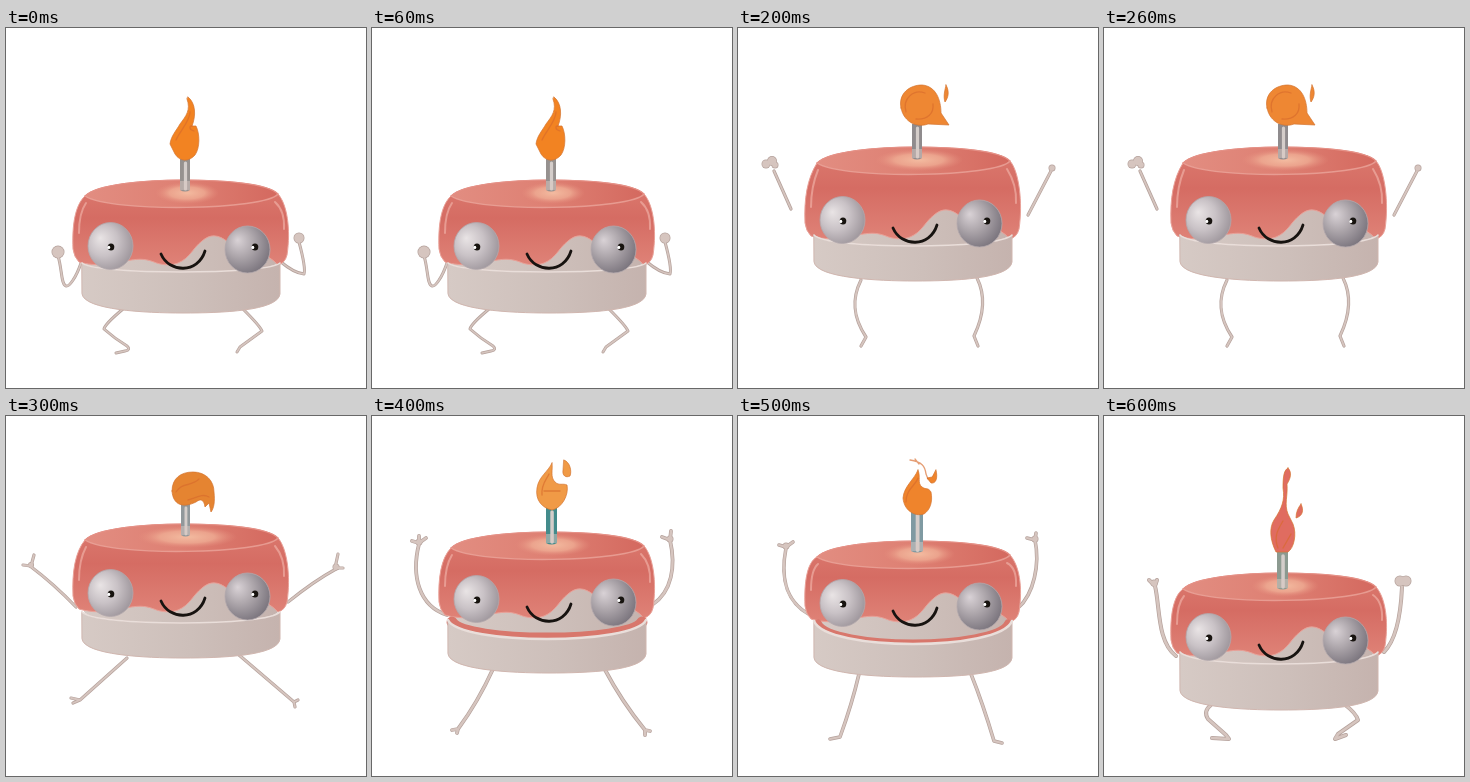
Animation, 360 px wide and 360 px high, one loop 700 ms. Source, as an HTML page:

```html
<!DOCTYPE html>
<html lang="en">
<head>
<meta charset="utf-8">
<title>Dancing cake</title>
<style>
  html, body { margin: 0; width: 100%; height: 100%; overflow: hidden; background: #fff; }
  svg { display: block; width: 100vw; height: 100vh; }
  path { stroke-linecap: round; stroke-linejoin: round; }
</style>
</head>
<body>
<svg viewBox="0 0 360 360">
  <defs>
    <linearGradient id="icing" x2="0" y2="1">
      <stop offset="0" stop-color="#dc7b70"/><stop offset=".45" stop-color="#d56c63"/><stop offset="1" stop-color="#df8277"/>
    </linearGradient>
    <linearGradient id="top">
      <stop offset="0" stop-color="#e28d81"/><stop offset=".5" stop-color="#de8073"/><stop offset="1" stop-color="#d4695f"/>
    </linearGradient>
    <linearGradient id="sponge">
      <stop offset="0" stop-color="#d6cac5"/><stop offset=".55" stop-color="#cdbfba"/><stop offset="1" stop-color="#c5b3ae"/>
    </linearGradient>
    <radialGradient id="glow">
      <stop offset="0" stop-color="#f3bba0"/><stop offset=".55" stop-color="#eeaa92" stop-opacity=".85"/><stop offset="1" stop-color="#e58d7d" stop-opacity="0"/>
    </radialGradient>
    <radialGradient id="eyeL" cx=".4" cy=".45" r=".65" fx=".27" fy=".33">
      <stop offset="0" stop-color="#e9e4e5"/><stop offset=".5" stop-color="#c9c2c6"/><stop offset="1" stop-color="#9a9298"/>
    </radialGradient>
    <radialGradient id="eyeR" cx=".38" cy=".4" r=".68" fx=".28" fy=".3">
      <stop offset="0" stop-color="#d9d2d6"/><stop offset=".45" stop-color="#aea7ac"/><stop offset="1" stop-color="#77717a"/>
    </radialGradient>
  </defs>
  <g id="stage"></g>
</svg>
<script>
const STEP = 100;

// y: eye line; top, bottom: cake edges from y; seam: [ends, middle] from y; gap: jam width
// wick: [left, right, top, bottom, colour]; hands: [x, y, radius]
const poses = [
  { y: 219, top: -67, bottom: 66, seam: [16, 25], gap: 0, glow: 32,
    wick: [174, 184, 131, 162, '#96918f'], colour: '#f28322',
    flame: 'M182 69C190 75 190 88 186 98L190 98C194 106 194 120 189 127C183 134 174 134 169 126L164 116C165 108 170 103 174 96C180 88 185 82 181 71Z',
    shine: 'M184 84C184 93 174 103 170 112M188 103C182 101 184 98 186 98',
    limbs: 'M75 235C70 250 63 259 60 258C55 257 56 240 52 228M275 234Q288 245 298 246Q300 240 293 214M117 281Q99 296 98 301Q108 310 121 318Q125 322 119 323L110 325M237 281Q254 298 256 303Q245 311 234 319L231 324',
    width: 2, hands: [[52, 224, 6], [293, 210, 5]] },
  { y: 212, top: -69, bottom: 66, seam: [23, 30], gap: 0, glow: 30,
    wick: [176, 184, 129, 157, '#aaa3a1'], colour: '#ee7628',
    flame: 'M194 67C201 72 200 82 194 90L191 97L196 98C197 112 194 125 187 131L177 131C169 122 163 110 168 102C175 92 193 88 192 70Z',
    shine: '',
    limbs: 'M75 233Q54 224 52 212Q49 195 50 180M276 229C294 218 297 190 298 161M114 276Q109 290 116 302L124 319L125 323L108 323M238 275Q244 289 239 302L231 319L233 322L244 324',
    width: 3, hands: [[50, 172, 5], [56, 173, 5.5], [299, 155, 7], [303, 154, 4]] },
  { y: 193, top: -74, bottom: 60, seam: [14, 25], gap: 0, glow: 44,
    wick: [174, 184, 96, 130, '#8f8b8d'], colour: '#ee8733',
    flame: 'M163 80C160 65 172 57 184 57C198 58 203 72 203 85L211 97L190 96C180 100 166 95 163 80ZM208 57C212 64 210 70 207 74C205 68 207 62 208 57Z',
    shine: 'M168 84C164 70 176 61 187 65M178 91C190 92 196 85 195 76',
    limbs: 'M53 181L36 143M290 187L313 143M123 252C114 270 114 288 128 309L123 318M239 250C248 268 246 287 236 308L240 318',
    width: 2.2, hands: [[28, 136, 4], [34, 133, 4.5], [37, 137, 3], [314, 140, 3]] },
  { y: 178, top: -70, bottom: 64, seam: [18, 29], gap: 0, glow: 50,
    wick: [175, 184, 88, 119, '#91989b'], colour: '#e58431',
    flame: 'M166 75C166 62 175 56 187 56C200 56 208 65 208 76C209 86 208 92 205 96L203 87L199 91C198 84 195 82 190 86C178 92 167 90 166 75Z',
    shine: 'M170 76C176 66 185 71 193 63M182 84C190 82 196 77 203 81',
    limbs: 'M70 191Q48 168 24 150M17 149L25 150L28 139M282 186Q308 165 330 153M337 152L329 152L332 138M121 242L74 284L65 282M74 284L67 287M233 239L288 286L292 284M288 286L289 291',
    width: 2.2, hands: [[25, 149, 2.5], [330, 151, 3]] },
  { y: 184, top: -68, bottom: 73, seam: [20, 39], gap: 6, glow: 38,
    wick: [174, 185, 92, 127, '#438b8b'], colour: '#f09a46',
    flame: 'M180 47C181 54 178 61 183 66C187 70 191 67 195 69C197 79 190 92 180 94C170 92 163 84 165 72C167 60 176 56 180 47ZM192 44C198 46 200 55 198 60C194 62 190 60 191 54Z',
    shine: 'M170 79C169 68 175 63 177 58M172 75L188 75',
    limbs: 'M75 199C47 190 39 160 47 128M40 125L47 127L54 122M47 127L47 120M280 189C300 176 304 150 298 124M290 121L298 124L299 115M121 253Q106 286 86 313L80 314M86 313L85 317M232 252Q250 286 273 314L278 315M273 314L273 319',
    width: 2.8, hands: [[47, 126, 3], [298, 123, 3]] },
  { y: 188, top: -63, bottom: 73, seam: [17, 40], gap: 4, glow: 36,
    wick: [173, 185, 95, 135, '#7f9aa2'], colour: '#ef842c',
    flame: 'M180 54C183 61 179 67 184 71C188 74 190 71 193 76C195 86 192 94 186 98C176 101 166 94 165 82C166 70 176 64 180 54ZM198 54C200 62 198 68 193 67L189 62L194 61Z',
    shine: 'M172 44C184 46 187 50 188 58L190 63M177 43L181 48M168 86C168 73 178 69 180 62',
    limbs: 'M72 199C45 184 43 158 48 132M41 129L48 131L55 126M280 192C296 178 302 148 297 124M289 122L297 124L298 117M121 258Q114 288 102 321L92 323M233 258Q245 288 256 325L264 327',
    width: 2.6, hands: [[48, 130, 3], [297, 123, 3]] },
  { y: 222, top: -65, bottom: 72, seam: [14, 26], gap: 0, glow: 34,
    wick: [173, 184, 136, 172, '#8c9a90'], colour: '#e06c60',
    flame: 'M184 52C188 56 187 62 183 68C184 80 180 88 184 98L189 108C193 118 190 132 184 136L172 136C166 124 165 112 170 104C178 92 181 84 179 72C179 60 180 54 184 52ZM197 88C200 94 199 100 192 102C192 96 194 92 197 88Z',
    shine: 'M174 132C169 120 175 112 179 105M179 132L187 118',
    limbs: 'M72 240C53 226 56 190 51 170L45 164M51 170L53 164M280 236C294 222 297 194 298 171M107 289Q99 295 104 303L122 319L125 323L108 322M240 288Q252 297 254 304L234 318L231 323L242 319',
    width: 3, hands: [[50, 167, 3], [296, 165, 5], [302, 165, 5]] }
];

const path = (d, fill, stroke = 'none', width = 1, extra = '') =>
  `<path d="${d}" fill="${fill}" stroke="${stroke}" stroke-width="${width}" ${extra}/>`;
const oval = (x, y, rx, ry, fill, extra = '') =>
  `<ellipse cx="${x}" cy="${y}" rx="${rx}" ry="${ry}" fill="${fill}" ${extra}/>`;

function limbs({ limbs: d, width, hands }) {
  const layer = (colour, grow) => path(d, 'none', colour, width + grow) +
    hands.map(([x, y, r]) => oval(x, y, r + grow / 2, r + grow / 2, colour)).join('');
  return layer('#b5a29c', 1) + layer('#d6c5bf', -.4);
}

function eye(x, y, id, pupil) {
  return oval(x, y, 22.5, 23.5, `url(#${id})`, 'stroke="#b3a9ac" stroke-width=".8"') +
    oval(pupil, 0, 3.3, 3.6, '#17130f') + oval(pupil - 2.2, .4, 1.5, 1.7, '#fff');
}

function cake({ top: t, bottom: b, seam: [ends, middle], gap, glow }) {
  const k = (4 * middle - ends) / 3;
  const seam = `M76 ${ends}C88 ${k} 262 ${k} 274 ${ends}`;
  const jam = `M80 ${ends + 2}C92 ${k - 2} 258 ${k - 2} 270 ${ends + 2}`;
  const back = `M79 ${t + 16}C90 ${t + 4} 140 ${t} 177 ${t}S262 ${t + 3} 272 ${t + 14}`;
  const icing = back + `C281 ${t + 24} 285 -18 281 8Q279 16 272 18C260 4 235 0 222 -5` +
    'C212 -13 204 -13 196 -6C186 2 184 11 172 16C164 19 155 18 148 15C138 11 130 12 120 14' +
    `C105 20 82 18 73 15Q68 10 67 2C66 -22 69 -42 79 ${t + 16}Z`;
  const rim = `C260 ${t + 30} 105 ${t + 33} 79 ${t + 16}`;
  const base = `${seam}L274 ${b - 19}C272 ${b - 2} 215 ${b} 177 ${b}S78 ${b - 3} 76 ${b - 19}Z`;
  return path(`M78 -20V${ends}C88 ${k} 262 ${k} 272 ${ends}V-20Z`, 'url(#sponge)') +
    path(icing, 'url(#icing)', '#e9a198', 1) +
    (gap ? path(jam, 'none', '#d8776c', gap * 1.8) : '') +
    path(base, 'url(#sponge)', '#d0b6af', 1) +
    path(seam, 'none', '#e9deda', gap ? 2.5 : 1.5) +
    path(back + rim + 'Z', 'url(#top)') +
    oval(181, t + 13, glow, 11, 'url(#glow)') +
    path(`M79 ${t + 16}C105 ${t + 33} 260 ${t + 30} 272 ${t + 14}`, 'none', '#eba69b', 1.4, 'opacity=".8"') +
    path(back, 'none', '#e59187', 1.2) +
    path(`M80 ${t + 23}Q73 -34 73 -14M269 ${t + 22}Q279 -36 278 -18`, 'none', '#efaea4', 2, 'opacity=".7"') +
    eye(104.5, -1, 'eyeL', 105) + eye(241.5, 2.5, 'eyeR', 249) +
    path('M155 7C163 26 192 27 199 4', 'none', '#171310', 2.8);
}

function candle({ wick: [l, r, y, end, colour], flame, colour: fire, shine }) {
  const w = r - l;
  return path(`M${l} ${y}H${r}V${end}Q${l + w / 2} ${end + 3} ${l} ${end}Z`, colour) +
    path(`M${l + w * .55} ${y + 4}V${end - 1}`, 'none', '#d4cdca', w * .32) +
    path(`M${l} ${end - 9}H${r}V${end}H${l}Z`, '#dbc8c2', 'none', 0, 'opacity=".5"') +
    path(flame, fire, '#d57430', .7) +
    path(shine, 'none', '#d76a2b', 1.3, 'opacity=".65"');
}

const stage = document.getElementById('stage');
stage.innerHTML = poses.map(p =>
  `<g>${limbs(p)}<g transform="translate(0 ${p.y})">${cake(p)}</g>${candle(p)}</g>`).join('');
const groups = [...stage.children];

const start = performance.now();
function draw() {
  const now = Math.floor((performance.now() - start) / STEP) % poses.length;
  groups.forEach((g, i) => g.style.display = i === now ? '' : 'none');
  requestAnimationFrame(draw);
}
draw();
</script>
</body>
</html>
```
